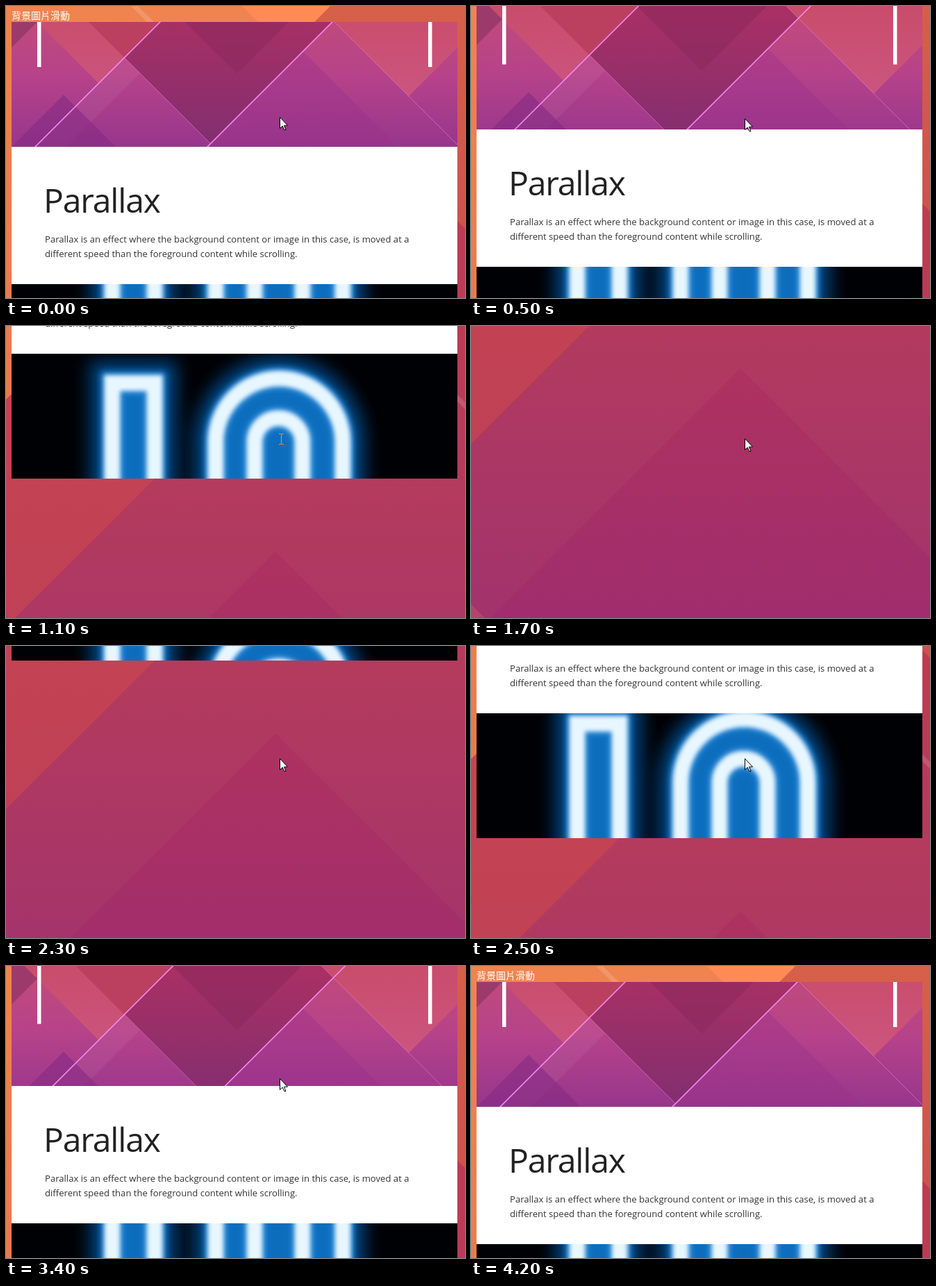
These frames come from a looping animation (661x421 px, 4.6 s). An HTML page:

```html
<!DOCTYPE html>
<html lang="zh-Hant">
<head>
<meta charset="utf-8">
<title>Parallax</title>
<style>
  html, body { margin: 0; width: 661px; height: 421px; overflow: hidden; background: #b23a5e; }
  svg { display: block; overflow: hidden; }
  text { font-family: "Open Sans", "Noto Sans", sans-serif; fill: #212121; }
  .caption { font: 14px "Noto Sans CJK TC", "Noto Sans CJK", sans-serif; fill: #fff; }
  .title { font-size: 48px; letter-spacing: -1.15px; }
  .body { font-size: 13.1px; fill: #333; }
  .neon path { stroke-linejoin: round; }
  #beam { stroke: #fff; fill: none; mix-blend-mode: difference; }
</style>
</head>
<body>
<svg width="661" height="421" viewBox="0 0 661 421">
  <defs>
    <linearGradient id="orange" gradientUnits="userSpaceOnUse" x1="0" y1="0" x2="0" y2="467">
      <stop stop-color="#f08450"/><stop offset="1" stop-color="#e87a4e"/>
    </linearGradient>
    <linearGradient id="red" gradientUnits="userSpaceOnUse" x1="0" y1="0" x2="0" y2="795">
      <stop stop-color="#d6604a"/><stop offset=".4" stop-color="#cd524e"/>
      <stop offset=".6" stop-color="#c54453"/><stop offset="1" stop-color="#c04055"/>
    </linearGradient>
    <linearGradient id="crimson" gradientUnits="userSpaceOnUse" x1="0" y1="300" x2="0" y2="1045">
      <stop stop-color="#be3c50"/><stop offset=".38" stop-color="#b43b5d"/><stop offset="1" stop-color="#a2336c"/>
    </linearGradient>
    <linearGradient id="plum" gradientUnits="userSpaceOnUse" x1="0" y1="686" x2="0" y2="1045">
      <stop stop-color="#ae3260"/><stop offset="1" stop-color="#a02d6d"/>
    </linearGradient>
    <linearGradient id="magenta" gradientUnits="userSpaceOnUse" x1="0" y1="0" x2="0" y2="203">
      <stop stop-color="#c34c78"/><stop offset=".5" stop-color="#b6428a"/><stop offset="1" stop-color="#97368c"/>
    </linearGradient>
    <linearGradient id="wine" gradientUnits="userSpaceOnUse" x1="0" y1="0" x2="0" y2="200">
      <stop stop-color="#ab3063"/><stop offset="1" stop-color="#822e70"/>
    </linearGradient>
    <linearGradient id="rose" gradientUnits="userSpaceOnUse" x1="0" y1="0" x2="0" y2="130">
      <stop stop-color="#c94c6a"/><stop offset="1" stop-color="#cb5580"/>
    </linearGradient>
    <filter id="wide" filterUnits="userSpaceOnUse" x="0" y="-40" width="661" height="480"><feGaussianBlur stdDeviation="12"/></filter>
    <filter id="mid" filterUnits="userSpaceOnUse" x="0" y="-40" width="661" height="480"><feGaussianBlur stdDeviation="5"/></filter>
    <filter id="fine" filterUnits="userSpaceOnUse" x="0" y="-40" width="661" height="480"><feGaussianBlur stdDeviation="3"/></filter>
    <path id="tubes" d="M153 400V82H214V400M302 400V167A91.5 91.5 0 0 1 485 167V400M358 400V167A34.5 34.5 0 0 1 427 167V400"/>
  </defs>

  <g id="page">
    <!-- page backdrop -->
    <rect width="661" height="1100" fill="url(#red)"/>
    <path d="M0 0H467L0 467Z" fill="url(#orange)"/>
    <path d="M340 0H467L403.500 63.500Z" fill="#ff8a54"/>
    <path d="M567.500 227.500L661 321V1100H0V795Z" fill="url(#crimson)"/>
    <path d="M180 0H190L661 471V481Z" fill="#fff" opacity=".14"/>
    <path d="M388 686L661 959V1100H-26Z" fill="url(#plum)"/>
    <path d="M0 1026L74 1100H0Z" fill="#b44468"/>
    <text class="caption" x="8" y="19">背景圖片滑動</text>

    <!-- first picture -->
    <svg x="8" y="23" width="642" height="180" viewBox="8 23 642 180">
      <g id="facets">
        <rect width="661" height="215" fill="url(#magenta)"/>
        <path d="M0 0H68L0 68Z" fill="#9c3a6c"/>
        <path d="M22 0H245L133.500 111.500Z" fill="url(#rose)"/>
        <path d="M96 0H245L170.500 74.500Z" fill="#bb4060"/>
        <path d="M170.500 74.500L193 97L77 213H32Z" fill="#fff" opacity=".05"/>
        <path d="M83 128L168 213H-2Z" fill="#852a84" opacity=".6"/>
        <path d="M245 0H493L294.500 198.500L170.500 74.500Z" fill="url(#wine)"/>
        <path d="M235 0H430L332.500 97.500Z" fill="#8c285e" opacity=".6"/>
        <path d="M427.500 65.500L575 213H280Z" fill="#98308a" opacity=".4"/>
        <path d="M450 0H710L580 130Z" fill="url(#rose)"/>
        <g fill="none" stroke="#f48af0">
          <path d="M245 0L32 213M493 0L280 213" stroke-width="1.6"/>
          <path d="M170.500 74.500L294.500 198.500M450 0L663 213" opacity=".5"/>
        </g>
        <path d="M45 0h5.500v88h-5.500zM608 0h5.500v88h-5.500z" fill="#fff"/>
      </g>
    </svg>

    <rect x="8" y="203" width="642" height="198" fill="#fff"/>
    <text class="title" x="54" y="298">Parallax</text>
    <text class="body" x="56" y="341">Parallax is an effect where the background content or image in this case, is moved at a</text>
    <text class="body" x="56" y="362">different speed than the foreground content while scrolling.</text>

    <!-- second picture -->
    <svg x="8" y="401" width="642" height="180" viewBox="8 401 642 180">
      <rect y="401" width="661" height="180" fill="#000104"/>
      <g id="neon" class="neon">
        <use href="#tubes" fill="#004a8c" stroke="#00427e" stroke-width="64" filter="url(#wide)"/>
        <use href="#tubes" fill="#0d6dbd" stroke="#1b7fd0" stroke-width="33" filter="url(#mid)"/>
        <use href="#tubes" fill="none" stroke="#e8f7ff" stroke-width="23" filter="url(#fine)"/>
      </g>
    </svg>
  </g>

  <path id="arrow" d="M.5 .5V16.500L4.200 13L6.800 18.500H9L6.500 12.200H11.500Z" fill="#fff" stroke="#000"/>
  <path id="beam" d="M393 155.500h3M397 155.500h3M396.500 156v14M393 170.500h3M397 170.500h3"/>
</svg>

<script>
  const LOOP = 4600;
  // [time, scroll offset]: the wheel scrolls in bursts, redrawn every 100 ms
  const scrollSteps = [
    [0, 0], [500, 25], [600, 85], [700, 155], [800, 213], [900, 285], [1000, 320],
    [1100, 361], [1200, 412], [1300, 427], [1500, 480], [1600, 590], [1700, 625],
    [2300, 560], [2400, 400], [2500, 304], [2800, 275], [2900, 190], [3000, 123], [3100, 91],
    [3300, 70], [3400, 30], [3500, 6], [3600, 0]
  ];
  // [time, x, y] of the pointer tip
  const pointerSteps = [
    [0, 394, 160], [200, 394, 162], [3800, 412, 152], [3900, 480, 112],
    [4000, 570, 58], [4100, 648, 15], [4200, 700, -30]
  ];

  const el = id => document.getElementById(id);
  const at = (steps, t) => steps.findLast(step => step[0] <= t);
  const move = (id, x, y) => el(id).setAttribute("transform", `translate(${x} ${y})`);

  function draw(now) {
    const t = now % LOOP;
    const scroll = at(scrollSteps, t)[1];
    const [, x, y] = at(pointerSteps, t);
    const overText = t >= 600 && t < 1300;

    move("page", 0, -scroll);
    move("facets", 0, scroll * 0.846);
    move("neon", 0, 188 + scroll * 0.48);
    move("arrow", x, y);
    el("arrow").style.display = overText ? "none" : "";
    el("beam").style.display = overText ? "" : "none";
  }

  const start = performance.now();
  function tick() {
    draw(performance.now() - start);
    requestAnimationFrame(tick);
  }
  tick();
</script>
</body>
</html>
```
